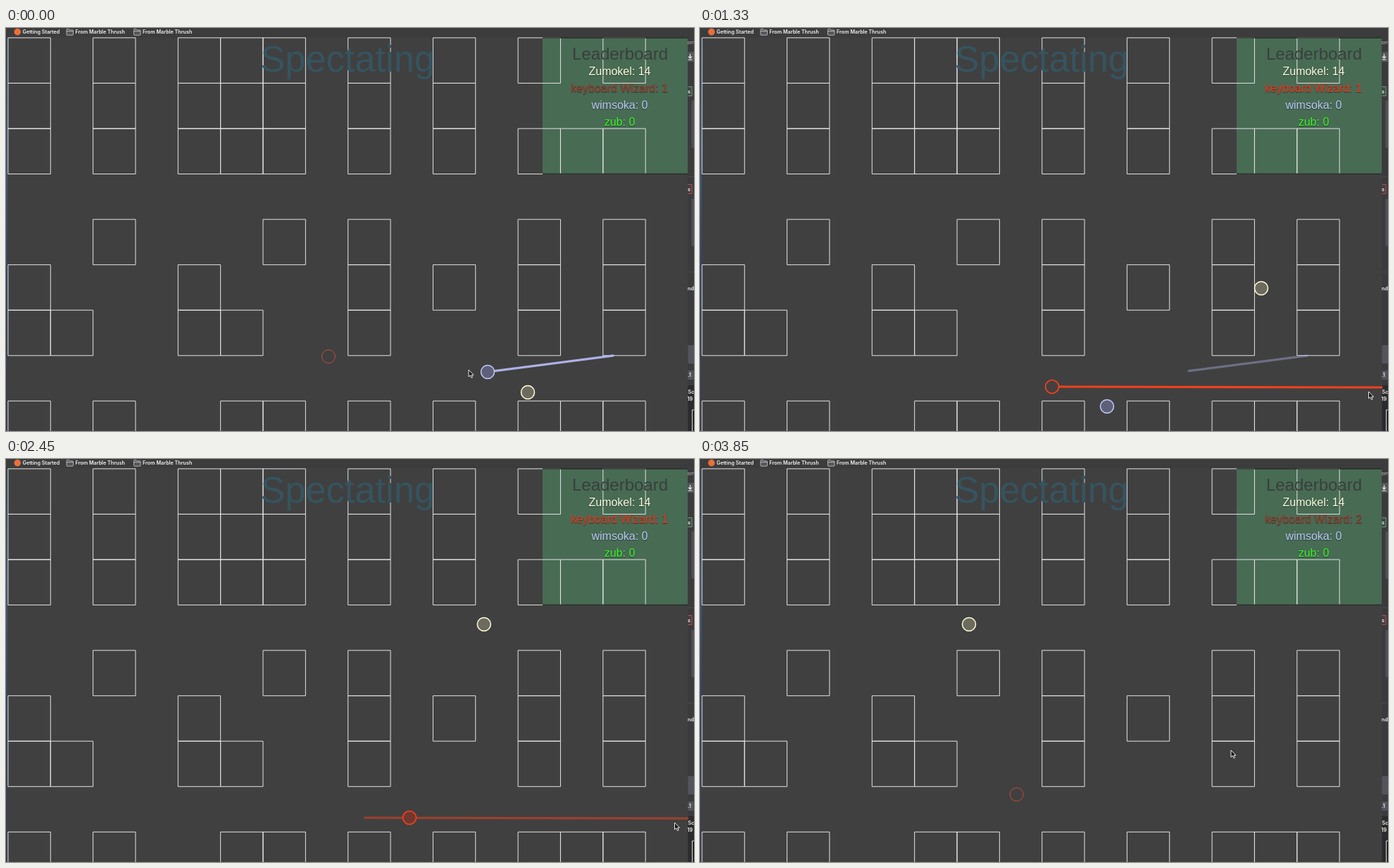
These frames come from a looping animation (977 by 573 pixels, 3.92 s). An HTML page:

```html
<!DOCTYPE html>
<html lang="en">
<head>
<meta charset="utf-8">
<title>Spectating</title>
<style>
  html, body { margin: 0; width: 100%; height: 100%; overflow: hidden; background: #404040; }
  svg { display: block; width: 977px; height: 573px; }
  .ui { font: 600 7.2px Inter, sans-serif; fill: #f4f4f4; }
  .game { font-family: "Liberation Sans", Arial, sans-serif; text-anchor: middle; }
  .score { font-size: 16px; text-shadow: 0 1px 1px #0008; }
  .beam { stroke-width: 3.2; stroke-linecap: round; }
  circle { stroke-width: 1.5; }
</style>
</head>
<body>
<svg viewBox="0 0 977 573">
  <defs>
    <linearGradient id="edge" x2="0" y2="1">
      <stop offset="0" stop-color="#33414f"/>
      <stop offset=".3" stop-color="#425a76"/>
      <stop offset=".57" stop-color="#354563"/>
      <stop offset="1" stop-color="#3c3e46"/>
    </linearGradient>
    <path id="folder" d="M.5 8.5V1.5Q.5.5 1.5.5H4L5 1.8H9Q10 1.8 10 2.8V8.5Q10 9.2 9 9.2H1.5Q.5 9.2.5 8.5ZM.5 3.6H10"
          fill="#55565a" stroke="#c9c9c9" stroke-width=".8"/>
  </defs>
  <rect width="977" height="573" fill="#404040"/>
  <rect width="977" height="13.5" fill="#3c3c3d"/>
  <rect y="13" width="2.4" height="560" fill="url(#edge)"/>

  <g class="ui">
    <circle cx="16.3" cy="5.6" r="4.8" fill="#e8703a"/>
    <text x="23.5" y="8.3">Getting Started</text>
    <use href="#folder" x="85.5" y="1"/>
    <text x="98.5" y="8.3">From Marble Thrush</text>
    <use href="#folder" x="181" y="1"/>
    <text x="194" y="8.3">From Marble Thrush</text>
  </g>

  <g class="ui">
    <rect x="968.5" y="14" width="9" height="559" fill="#3b3b3d"/>
    <path d="M968.5 211.5h9M968.5 347h9" stroke="#4b4b4f"/>
    <rect x="968.5" y="34" width="9" height="14" fill="#56575c"/>
    <path d="M971.5 37v6m-2.5-2.5 2.5 2.5 2.5-2.5M968.5 45h6" fill="none" stroke="#eee" stroke-width="1.2"/>
    <path d="M968.5 83.5H974v13h-5.5" fill="#3f4a44" stroke="#6f9d80"/>
    <path d="M968.5 222.5H974v13h-5.5" fill="#4a3d3f" stroke="#a8545c"/>
    <path d="M973.5 103h4v67h-4zM973.5 243h4v67h-4z" fill="#50505a"/>
    <path d="M968.5 451h9v26h-9zM968.5 487h8v13h-8z" fill="#54555c"/>
    <rect x="968.5" y="508" width="9" height="65" fill="#2b2b2d"/>
    <path d="M978 543H974.5V573" fill="#222" stroke="#ddd"/>
    <text x="967.5" y="23" fill="#bbb" font-weight="400">om</text>
    <text x="968" y="92.5">s</text>
    <text x="968" y="231.5">s</text>
    <text x="968" y="373">nd</text>
    <text x="968" y="496">.1</text>
    <text x="968.5" y="519.5">Sc</text>
    <text x="967.5" y="530">19</text>
  </g>

  <rect x="762" y="14" width="206" height="193.5" fill="#486b54"/>
  <path id="grid" fill="none" stroke="#e4e4e4"/>
  <path d="M762 14H968M762 207.5H968" stroke="#26302a" stroke-width="1.4"/>
  <text class="game" x="485.2" y="61.8" font-size="52.4" fill="#35545f">Spectating</text>

  <g class="game">
    <text x="872" y="44.5" font-size="24" fill="#393f3c">Leaderboard</text>
    <g class="score">
      <text x="871.5" y="66.5" fill="#ffffe0">Zumokel: 14</text>
      <text x="871" y="90.5" id="redScore"></text>
      <text x="871.5" y="115" fill="#bccaf8">wimsoka: 0</text>
      <text x="871.5" y="139" fill="#3dfa28">zub: 0</text>
    </g>
  </g>

  <path id="blueBeam" class="beam" d="M694 487.6L862 465.8" stroke="#b6baf2"/>
  <path id="redBeam" class="beam" d="M510 510L968 511" stroke="#f4421e"/>
  <path id="downBeam" d="M583.8 519.5L590.3 573" stroke="#cf4a35" stroke-width="1.5"/>
  <circle id="blue" r="9.5" fill="#5d6078" stroke="#c3caf8"/>
  <circle id="yellow" r="9.5" fill="#6d6a5e" stroke="#ffffdc"/>
  <circle id="red" r="9.5"/>
  <path id="cursor" d="M0 0V9.8L2.3 7.8 4 11.4 5.6 10.7 4 7.3H7Z" fill="#111" stroke="#fff" stroke-width=".9"/>
</svg>
<script>
const LOOP = 3920, STEP = 70;
const FIRST_SHOT = 1260, SECOND_SHOT = 2870;
const $ = id => document.getElementById(id);

const level = [
  "#.#.###.#.#.#.#",
  "#.#.###.#.#....",
  "#.#.###.#.#.###",
  "",
  "..#...#.#...#.#",
  "#...#...#.#.#.#",
  "##..##..#...#.#",
  "",
  "#.#..##.#.#.###"
];
const CELL_W = 60.35, CELL_H = 64.55;
const outline = (c, r) =>
  `M${2.9 + c * CELL_W} ${13.9 + r * CELL_H}h${CELL_W}v${CELL_H}h${-CELL_W}z`;
$("grid").setAttribute("d", level.map((row, r) =>
  [...row].map((cell, c) => cell === "#" ? outline(c, r) : "").join("")).join(""));

// Waypoints as "time x,y", joined by straight moves
const routes = {
  blue: "0 684,489 > 630 641,489 > 1050 578,489 > 1610 578,587",
  yellow: "0 741,518 > 630 820,481 > 1330 797,370 > 1820 780,224.5 > 2450 678.8,235 > 2940 591.2,235 > 3850 382,235",
  red: "0 458,467 > 630 475.7,507 > 1330 500,510 > 1820 475.2,510 > 2450 573,510 > 2940 582,510 > 3850 449.7,477",
  cursor: "0 657,486 > 630 822.5,478 > 1190 949.5,517 > 3080 949.5,517 > 3850 754,414"
};
for (const id in routes)
  routes[id] = routes[id].split(" > ").map(stop => stop.split(/[ ,]/).map(Number));

function locate(route, t) {
  const next = route.findIndex(stop => stop[0] > t);
  if (next < 0) return route[route.length - 1].slice(1);
  const [t0, x0, y0] = route[next - 1], [t1, x1, y1] = route[next];
  const k = (t - t0) / (t1 - t0);
  return [x0 + (x1 - x0) * k, y0 + (y1 - y0) * k];
}

const fade = (t, since) => Math.max(0, 1 - (t - since) * 0.00041);

function draw(t) {
  for (const id in routes)
    $(id).setAttribute("transform", `translate(${locate(routes[id], t)})`);

  const vivid = t >= FIRST_SHOT && t < SECOND_SHOT;
  $("blueBeam").style.opacity = fade(t, -170);
  $("redBeam").style.opacity = vivid ? fade(t, FIRST_SHOT) : 0;
  $("downBeam").style.opacity = t >= SECOND_SHOT && t < 3430 ? 1 : 0;

  const red = $("red").style;
  red.stroke = vivid ? "#f4421e" : "#c64a3a";
  red.strokeWidth = vivid ? 1.7 : 1;
  red.fill = !vivid ? "none" : t < 2170 ? "#444040" : "#71382f";

  const score = $("redScore");
  score.textContent = "keyboard Wizard: " + (t < SECOND_SHOT ? 1 : 2);
  score.style.fill = vivid ? "#f4351c" : "#a03a2c";
}

const start = performance.now();
function tick() {
  const t = (performance.now() - start) % LOOP;
  draw(Math.floor(t / STEP) * STEP);
  requestAnimationFrame(tick);
}
tick();
</script>
</body>
</html>
```
